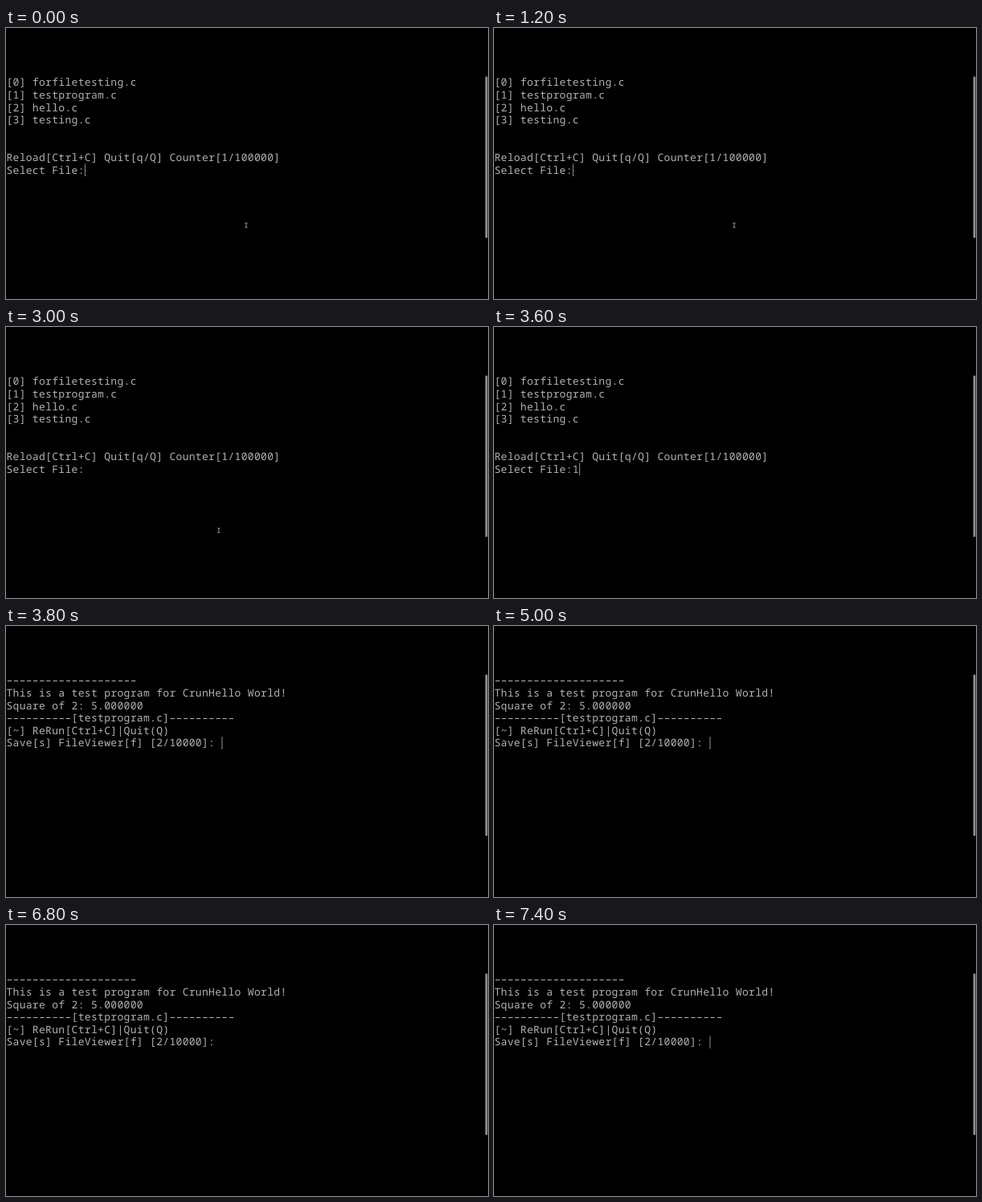
These frames come from a looping animation (600x338 px, 8 s). An HTML page:

```html
<!DOCTYPE html>
<html lang="en">
<head>
<meta charset="utf-8">
<title>Terminal file picker</title>
<style>
  html, body { margin: 0; width: 100%; height: 100%; overflow: hidden; background: #000; }
  svg { display: block; width: 100%; height: 100%; }
  text {
    font: 13px "Noto Sans Mono", "DejaVu Sans Mono", monospace;
    letter-spacing: 0.32px;
    font-variant-ligatures: none;
    text-rendering: geometricPrecision;
    white-space: pre;
    fill: #b2b2b2;
  }
</style>
</head>
<body>
<svg viewBox="0 0 600 338">
  <rect width="600" height="338" fill="#000"/>
  <g id="menu"></g>
  <g id="run"></g>
  <rect id="caret" width="1.2" height="15.6" fill="#7c7c7c"/>
  <path id="pointer" d="M-1.6-2.9Q0-2.9 0-2V2Q0 2.9-1.6 2.9M1.6-2.9Q0-2.9 0-2M0 2Q0 2.9 1.6 2.9" fill="none" stroke="#b0b0b0" stroke-width="0.9"/>
  <rect x="596.6" y="60.5" width="2.8" height="201.5" rx="1.4" fill="#929292"/>
</svg>
<script>
const LOOP = 8000, BLINK = 600, RUN_AT = 3800, KEY_AT = 3600;
const CELL = 8.12, ROW = 15.6, LEFT = 0.4, TOP = 60.2, BASE = 12.1;
const $ = id => document.getElementById(id);
const rule = n => '–'.repeat(n);

const menuRows = [
  '[0] forfiletesting.c',
  '[1] testprogram.c',
  '[2] hello.c',
  '[3] testing.c',
  '',
  '',
  'Reload[Ctrl+C] Quit[q/Q] Counter[1/100000]',
  'Select File:'
];
const runRows = [
  rule(20),
  'This is a test program for CrunHello World!',
  'Square of 2: 5.000000',
  rule(10) + '[testprogram.c]' + rule(10),
  '[~] ReRun[Ctrl+C]|Quit(Q)',
  'Save[s] FileViewer[f] [2/10000]: '
];

function addRows(id, rows) {
  return rows.map((row, i) => {
    const el = document.createElementNS('http://www.w3.org/2000/svg', 'text');
    el.setAttribute('x', LEFT);
    el.setAttribute('y', TOP + BASE + i * ROW);
    el.textContent = row;
    $(id).appendChild(el);
    return el;
  });
}

const show = (id, on) => $(id).setAttribute('visibility', on ? 'visible' : 'hidden');
const prompt = addRows('menu', menuRows).pop();
addRows('run', runRows);

function draw(t) {
  const running = t >= RUN_AT;
  const rows = running ? runRows : menuRows;
  let line = rows[rows.length - 1];
  if (!running) {
    if (t >= KEY_AT) line += '1';
    prompt.textContent = line;
  }
  show('menu', !running);
  show('run', running);

  // The blink restarts when the program's output appears.
  const phase = running ? t - RUN_AT : t;
  show('caret', Math.floor(phase / BLINK) % 2 === 0);
  $('caret').setAttribute('x', line.length * CELL + LEFT);
  $('caret').setAttribute('y', TOP + (rows.length - 1) * ROW);

  const [x, y] = t < 1600 ? [299, 246] : t < 1800 ? [289, 250] : [264.8, 253.8];
  $('pointer').setAttribute('transform', `translate(${x} ${y})`);
  show('pointer', t < KEY_AT);
}

const start = performance.now();
function tick() {
  draw((performance.now() - start) % LOOP);
  requestAnimationFrame(tick);
}
tick();
</script>
</body>
</html>
```
